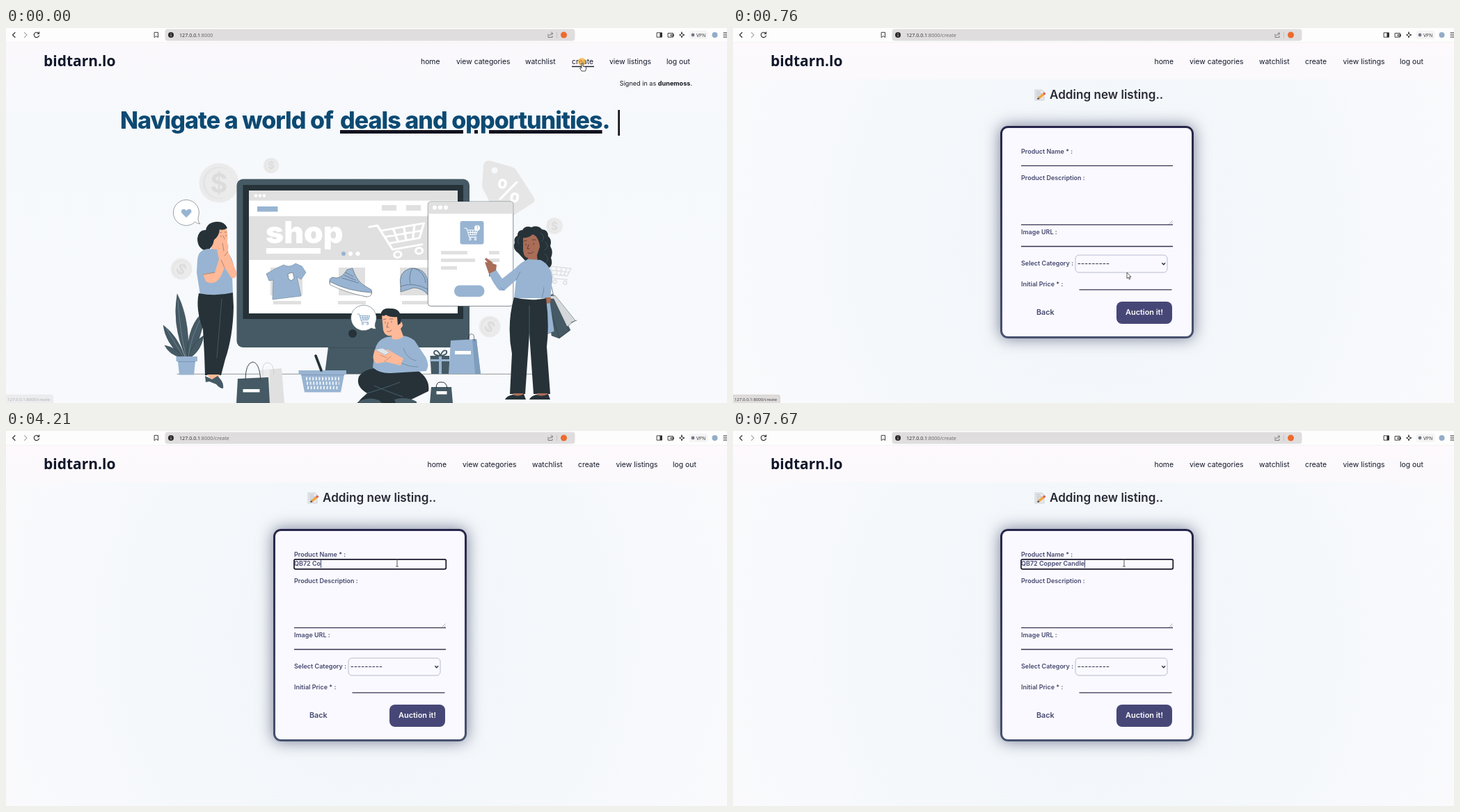
An HTML page that plays this animation: 1036 by 540 pixels, repeating every 8 s.

```html
<!DOCTYPE html>
<html lang="en">
<head>
<meta charset="utf-8">
<title>Create a listing</title>
<style>
html, body { margin: 0; width: 100%; height: 100%; overflow: hidden; }
body { position: relative; font-family: Inter, "Open Sans", sans-serif;
  background: radial-gradient(ellipse 560px 620px at 518px 300px, #f1f6fa, #f4f8fb 50%, #fafafd); }
svg, .layer { position: absolute; left: 0; top: 0; width: 1036px; height: 540px; }
svg { overflow: hidden; }
.header { position: absolute; top: 21px; left: 0; width: 100%; height: 53px;
  background: linear-gradient(#fdf9fc, #fbf9fc); }
#home { background: linear-gradient(#fbf8fc 21px, #f6f9fc 130px, #f7f9fc); }
.small { font-family: "Open Sans", "Noto Sans", sans-serif; }
.nav { font-size: 10.4px; fill: #121829; }
.headline { position: absolute; top: 113px; font: 800 34px/40px Inter, sans-serif; letter-spacing: -.028em;
  white-space: pre; color: #0d4a73; }
.headline u { text-decoration: underline 4.5px #10131f; text-underline-offset: 2px; }
.card { position: absolute; left: 384px; top: 141px; width: 272px; height: 300px; border: 3px solid transparent;
  border-radius: 11px; box-shadow: 0 0 22px rgba(40, 46, 82, .62);
  background: linear-gradient(#faf9ff, #faf9ff) padding-box, linear-gradient(#27254a, #47526f) border-box; }
.label { font-size: 9px; font-weight: 600; fill: #45496f; }
.typed { position: absolute; left: 414px; top: 185px; height: 12px; font: 600 9px/12px Inter, sans-serif;
  white-space: pre; color: #45496f; border-right: 1px solid transparent; }
.blue { fill: #98b4d2; } .teal { fill: #455a64; } .dark { fill: #263238; }
.grey { fill: #e0e0e0; } .pale { fill: #ebebeb; } .white { fill: #fff; }
.skin { fill: #ffb998; } .brown { fill: #a96d58; }
.line { fill: none; stroke: var(--c, #263238); stroke-width: var(--w, .6);
  stroke-linecap: round; stroke-linejoin: round; }
.coin text { font-weight: 700; font-size: 20px; fill: #dcdcdc; text-anchor: middle; }
</style>
</head>
<body>
<div class="header"></div>

<div class="layer" id="home">
<svg viewBox="0 0 1036 540">
  <defs>
    <g id="cart" fill="none" stroke="currentColor" stroke-linejoin="round" stroke-linecap="round">
      <path d="M0 4H6L14 27H36M8 9H40L35 21H12M10 15H37M17 9L19 21M25 9V21M33 9L30 21"/>
      <circle cx="17" cy="32" r="2.6"/><circle cx="33" cy="32" r="2.6"/>
    </g>
    <g id="coin" class="coin">
      <circle r="15" class="pale"/><circle r="12.300" fill="#e4e4e5"/><circle cx="1" r="11.500" class="pale"/>
      <text y="7.300">$</text>
    </g>
  </defs>

  <g class="nav">
    <text x="596">home</text><text x="647">view categories</text><text x="746">watchlist</text>
    <text x="813">create</text><text x="867">view listings</text><text x="949">log out</text>
  </g>
  <rect x="813" y="54.800" width="32" height="1.400" fill="#121829"/>
  <text x="986" y="83" text-anchor="end" font-size="9.100" fill="#15171f">Signed in as <tspan font-weight="700">dunemoss</tspan>.</text>
  <rect x="879.300" y="118" width="2.700" height="37" fill="#11131b"/>

  <!-- background pieces -->
  <use href="#coin" transform="translate(306 223) scale(1.9)"/>
  <use href="#coin" transform="translate(381 198) scale(.75)"/>
  <use href="#coin" transform="translate(788 285) scale(.8)"/>
  <use href="#coin" transform="translate(252 347) rotate(35) scale(1.03)"/>
  <use href="#coin" transform="translate(695 430) rotate(35) scale(1.03)"/>
  <path fill="#e6e6e6" d="M684 229L686 197Q688 190 695 191L727 200Q732 202 734 206L759 245Q761 249 757 252L729 270H705Z"/>
  <circle cx="702" cy="205" r="4.500" fill="#f6f9fc"/>
  <text x="722" y="249" font-size="41" font-weight="600" text-anchor="middle" class="white" transform="rotate(10 722 235)">%</text>
  <use href="#cart" transform="translate(776 334) rotate(6) scale(.93)" color="#e0e1e2" stroke-width="1.8"/>
  <path class="line" style="--w:.5" d="M246 498.300H757"/>

  <!-- heart bubble -->
  <path class="white" stroke="#37474f" stroke-width=".5" d="M272 279A18.500 18.500 0 1 1 276 273Q276 280 279 282Q274 282 272 279Z"/>
  <path class="blue" d="M259 273L253 267Q250 263 254 261Q257 260 259 263Q262 260 265 261Q268 264 265 267Z"/>

  <!-- monitor -->
  <path class="teal" d="M463 459H548L556 498H458Z"/>
  <path class="line" d="M463 460H548"/>
  <rect class="teal" x="331.500" y="217.500" width="334.500" height="242.500" rx="9"/>
  <rect class="dark" x="340.500" y="226" width="316.500" height="193"/>
  <rect class="white" x="349" y="234" width="300" height="177"/>
  <g class="grey">
    <path d="M349 234H649V248.500H349ZM349 271H649V334H349ZM540 255H561V263H540ZM575 255H596V263H575Z"/>
    <path d="M380 345H426V385H380ZM478 345H516V385H478ZM566 345H606V385H566Z"/>
    <path d="M384 393H424V398H384ZM477 393H517V398H477ZM569 393H606V398H569Z"/>
  </g>
  <g class="white"><circle cx="359" cy="241.500" r="2.300"/><circle cx="365" cy="241.500" r="2.300"/><circle cx="371" cy="241.500" r="2.300"/>
    <circle cx="495" cy="325" r="3"/><circle cx="505.500" cy="325" r="3"/><rect x="374" y="317" width="78" height="8"/></g>
  <circle class="blue" cx="485" cy="325" r="3"/>
  <rect class="blue" x="361" y="257" width="29.500" height="7.500"/>
  <text x="373" y="310" font-size="44.500" font-weight="900" class="white">shop</text>
  <use href="#cart" transform="translate(521 280) rotate(-10) scale(1.95 1.65)" color="#fff" stroke-width="1.7"/>
  <circle class="dark" cx="498" cy="440" r="6"/>

  <!-- products -->
  <path class="blue" stroke="#5b7690" stroke-width=".5" d="M388 346L399 341Q407 346 416 339L425 343L431 352L424 362L418 358L424 386L383 391L384 363L378 364L374 354Z"/>
  <path class="white" stroke="#37474f" stroke-width=".5" d="M405 354L412 352L414 360L410 364L406 361Z"/>
  <path class="blue" stroke="#37474f" stroke-width=".5" d="M465 363Q467 357 474 360Q483 360 490 348L498 346Q503 362 512 369L525 377Q528 385 518 387Q492 381 465 368Z"/>
  <path class="white" stroke="#37474f" stroke-width=".5" d="M465 365Q490 379 525 381Q526 387 518 387Q491 382 466 370Z"/>
  <path class="line" style="--w:.4" d="M488 352L499 358M486 356L502 363M483 360L506 367"/>
  <path class="blue" stroke="#37474f" stroke-width=".5" d="M567 372Q563 351 581 346Q604 345 606 366V384Q599 375 586 374L567 380Z"/>
  <path class="line" style="--w:.4" d="M567 372Q585 365 606 376M584 346Q578 356 581 368M587 346Q602 352 603 367"/>

  <!-- floating window -->
  <rect class="white" x="606.300" y="250" width="122.500" height="150.500" rx="4" stroke="#37474f" stroke-width=".6"/>
  <path class="grey" d="M606.600 267.500V254Q606.600 250.300 610 250.300H725Q728.500 250.300 728.500 254V267.500Z"/>
  <g class="white"><circle cx="616" cy="258.500" r="3"/><circle cx="624" cy="258.500" r="3"/><circle cx="632" cy="258.500" r="3"/></g>
  <rect class="blue" x="652.500" y="278" width="34" height="33.500" rx="3"/>
  <use href="#cart" transform="translate(659 286) scale(.47 .56)" color="#fff" stroke-width="1.9"/>
  <circle class="white" cx="677" cy="288" r="4"/>
  <text x="677" y="290" font-size="5.500" text-anchor="middle" fill="#7d9fc3">1</text>
  <path class="grey" d="M625 321H663V326H625ZM694 321H709V326H694ZM625 332H674V337H625ZM694 332H709V337H694ZM625 343H648V348H625Z"/>
  <rect class="teal" x="694" y="353" width="9" height="4.500"/>
  <rect class="blue" x="644" y="370.500" width="43.500" height="16.500" rx="8"/>

  <!-- plant -->
  <g class="teal" stroke="#263238" stroke-width=".4">
    <path d="M258 474Q238 427 246 383Q264 418 262 474Z"/>
    <path d="M260 474Q261 425 286 407Q283 445 264 474Z"/>
    <path d="M257 474Q247 444 226 428Q229 453 253 474Z"/>
    <path d="M262 474Q269 451 284 443Q281 463 266 474Z"/>
    <path d="M255 474Q245 460 228 457Q235 471 251 474Z"/>
  </g>
  <path class="line" style="--c:#90a4ae;--w:.5" d="M247 392Q250 440 259 474M284 412Q266 440 262 474M230 432L255 474"/>
  <path class="blue" d="M244.500 473H275V480H272L270 499.500H249L247 480H244.500Z"/>
  <path class="line" style="--c:#6784a3" d="M247 480.500H272"/>

  <!-- left woman -->
  <path class="skin" d="M302 287L317 288L318.500 299L318 309Q315 319 307 319L306 327L294 323L297 305Z"/>
  <path class="dark" d="M318 288Q314 278 302 279Q289 280 287 291Q277 290 275 303Q275 318 288 321Q297 317 299 305Q306 300 307 290Q312 292 318 288Z"/>
  <path class="blue" d="M291 318Q276 319 275 334L274 352L279 384Q302 388 326 382L325 356L328 350Q327 330 316 321L306 319Z"/>
  <path class="skin" d="M283 354L300 352L306 333L303 319Q302 310 307 307L311 310L315 306Q321 309 319 322L331 351Q332 362 324 360L314 345L309 357Q301 372 287 365Z"/>
  <path class="line" style="--c:#6c4a3d;--w:.5" d="M309 299V301M316 298V300M307 295L310 294M314 294L317 294M312 299L314 304M311 310L313 321M319 322L314 328M283 355L300 352M314 345L309 334"/>
  <path class="dark" d="M277 382Q301 387 326 381L327 402Q326 445 315 477L309 500H286L285 470L283 434Q272 404 277 382Z"/>
  <path class="line" style="--c:#607d8b;--w:.5" d="M310 390Q306 439 303 475"/>
  <path class="skin" d="M289 499H307L305 505L294 506Z"/>
  <path class="teal" d="M286 501L296 506L304 501Q307 504 309 507Q313 512 312 519Q307 519 302 513L292 509L287 510Z"/>

  <!-- bags and basket, left -->
  <path class="grey" d="M364 493L396 490L400 540H366Z"/><path class="pale" d="M364 493L379 491V540H366Z"/>
  <path class="line" style="--c:#b9c0c4" d="M369 500Q367 481 376 482Q385 482 385 499"/>
  <path class="teal" d="M333 505L377 503L379 540H331Z"/>
  <path class="line" style="--c:#37474f;--w:1" d="M344 507Q344 483 354 481Q364 481 366 507"/>
  <rect class="white" x="340.500" y="520" width="24" height="4.500"/>
  <path class="blue" d="M420.500 493H489V499H486L481 524.500H429L424 499H420.500Z"/>
  <path stroke="#edf3f8" stroke-width="4.600" stroke-dasharray="2 2.600" d="M431 505H480M432 511.500H479M433 518H478" fill="none"/>
  <path class="line" style="--c:#6c89a7" d="M424 499.500H486"/>
  <path class="line" style="--w:3.600" d="M445 472L453 493"/>

  <!-- gift and bags, right -->
  <path class="teal" d="M609.500 472H637V498H611Z"/>
  <path class="blue" d="M622 472H626V498H622ZM609 477H637V480H609Z"/>
  <path class="line" style="--c:#455a64;--w:1.800" d="M624 472Q612 471 616 465Q621 463 624 472Q628 462 633 465Q635 471 624 472"/>
  <path class="blue" d="M639 450L676 448L682 498H636Z"/><path fill="#7f9dbc" d="M670 448L676 448L682 498H674Z"/>
  <rect class="white" x="645" y="465" width="23" height="5"/>
  <path class="line" d="M664 448Q666 437 672 442L673 450"/>

  <!-- seated man -->
  <path class="white" stroke="#37474f" stroke-width=".5" d="M525 432A18.300 18.300 0 1 1 531 424Q529 430 532 433Q527 434 525 432Z"/>
  <use href="#cart" transform="translate(505 410) scale(.44 .5)" color="#7d9fc3" stroke-width="1.9"/>
  <path class="dark" d="M507 502Q502 516 519 526L510 534L505 540H572L607 523Q610 505 590 492L532 490Q514 491 507 502Z"/>
  <path class="line" style="--c:#607d8b" d="M519 526Q540 520 566 510M570 531Q544 522 529 515"/>
  <path class="teal" d="M510 536Q524 531 536 536L540 540H504ZM558 535Q575 530 590 538V540H560Z"/>
  <path class="blue" d="M547 445Q533 449 530 464L527 489Q538 498 553 497L587 495L604 494Q609 485 603 474L587 450Q578 443 568 443Z"/>
  <path class="line" style="--c:#5b7690" d="M571 461Q576 477 589 479M560 477Q573 488 592 488M533 465L540 469"/>
  <path class="skin" d="M540 413L542 435Q545 445 554 443L555 448Q565 450 571 444L567 433Q573 428 567 422L562 412Z"/>
  <path class="dark" d="M538 413Q540 402 553 404Q566 403 568 418L567 425L563 428L562 416Q552 417 546 413Q542 416 538 413Z"/>
  <path class="line" style="--c:#654337" d="M545 423V425M554 422V424M542 420L546 419M551 419L556 419M549 424L547 431L550 431M548 437Q552 438 554 435"/>
  <path class="skin" d="M530 463L549 463L557 468L571 476L567 486L547 481L532 483Q526 478 528 470Z"/>
  <path fill="#dfe6eb" stroke="#90a4ae" stroke-width=".5" d="M530 463L541 461L551 467L545 471Z"/>
  <path class="line" style="--c:#8e6350;--w:.5" d="M538 471L547 475M543 481L553 473"/>

  <!-- front bag -->
  <path class="teal" d="M611 517H640L642 540H609Z"/><rect class="white" x="618.500" y="523" width="15" height="4.500"/>
  <path class="line" style="--w:1" d="M618 519Q618 509 625 510Q633 509 634 519"/>

  <!-- right woman -->
  <path class="dark" d="M742 291Q746 284 755 287Q764 283 770 290Q779 290 779 300Q785 305 782 314Q787 322 783 331Q787 342 779 346Q771 352 764 346L754 344L736 324Q727 318 731 309Q729 302 735 299Q735 291 742 291Z"/>
  <path class="line" style="--c:#546e7a;--w:.5" d="M768 295Q776 300 770 307M775 308Q782 315 774 320M774 325Q783 332 775 339M738 301Q733 306 737 311"/>
  <path class="brown" d="M743 302Q751 303 757 297Q766 301 767 315L763 327L764 338L748 338L750 331Q744 331 743 320Z"/>
  <path class="line" style="--c:#48291f;--w:.7" d="M747 311V313M758 310V312M744 307L748 306M756 305L761 305M751 312L749 318L752 318M750 324Q755 326 758 322"/>
  <path class="blue" d="M750 333Q740 337 732 346L713 361L704 348L694 354Q701 370 709 378L716 378L733 363L730 389H777L785 365Q785 342 768 334Z"/>
  <path class="line" style="--c:#5b7690" d="M733 363L739 351M772 350Q776 369 770 389M716 378L711 374"/>
  <path class="brown" d="M694 354L690 343L688 337L696 338L705 341L704 349Z"/>
  <path class="brown" d="M695 341L688 333L690 331L700 338Z"/>

  <g stroke="#263238" stroke-width=".4">
    <path class="teal" d="M777 389L785 383L811 435L795 447L784 443Z"/>
    <path fill="#d5d8da" d="M780 386L789 385L818 421L805 431Z"/>
    <path class="teal" d="M777 390L787 390L809 436L795 446Z"/>
    <path class="blue" d="M773 391L781 389L788 437L773 442L770 431Z"/>
  </g>
  <path class="line" d="M778 371L780 388M783 369L787 386M812 424L820 421"/>
  <path class="blue" d="M769 341Q784 341 785 361L782 390L775 389L772 367Z"/>
  <path class="brown" d="M775 388L783 388L782 396L776 397Z"/>

  <path class="dark" d="M730 388Q754 394 776 389Q781 427 777 459L782 527H758L752 440L746 527H724L727 469Q719 427 730 388Z"/>
  <path class="line" style="--c:#607d8b" d="M752 400V447"/>
  <path class="brown" d="M729 526H743V531H728ZM763 526H778V531H763Z"/>
  <path class="dark" d="M728 528Q736 532 744 527L747 535H717Q719 530 728 528ZM762 528Q770 532 779 527L782 535H752Q754 530 762 528Z"/>
</svg>
<div class="headline" style="left:164px">Navigate a world of </div>
<div class="headline" style="left:480px"><u>deals and opportunities</u>.</div>
</div>

<div class="layer" id="form">
<div class="card"></div>
<svg viewBox="0 0 1036 540">
  <g class="nav">
    <text x="605.500">home</text><text x="656">view categories</text><text x="756">watchlist</text>
    <text x="822">create</text><text x="876.500">view listings</text><text x="958">log out</text>
  </g>
  <path fill="#e6e8ea" stroke="#b9bfc4" stroke-width=".6" d="M434 89H444L447 92V104H434Z"/>
  <path stroke="#9aa3aa" stroke-width=".7" d="M436 92H442M436 95H444M436 98H441M436 101H440"/>
  <path stroke="#f2a33c" stroke-width="3.400" d="M439.500 101L446 95.500"/>
  <path stroke="#dc6358" stroke-width="3.400" d="M446 95.500L448.500 93.500"/>
  <path fill="#51423a" d="M437 103L438.400 99.700L440.600 102.300Z"/>
  <text x="455" y="102" font-size="17.100" font-weight="600" fill="#2a2a36">Adding new listing..</text>

  <g class="label">
    <text x="414" y="181">Product Name * :</text><text x="414" y="219">Product Description :</text>
    <text x="414" y="297.300">Image URL :</text><text x="414" y="342.300">Select Category :</text>
    <text x="414" y="371.500">Initial Price * :</text>
    <text x="436" y="413" font-size="10.800">Back</text>
  </g>
  <path stroke="#35334f" stroke-width="1.300" d="M414 198.300H632M414 283.400H632M414 314.500H632M497.500 376.800H630.500"/>
  <path stroke="#777" stroke-width=".6" d="M626.500 282.500L631.500 277.500M629.500 282.500L631.500 280.500"/>
  <rect x="492" y="327" width="132" height="25" rx="5" fill="#faf9ff" stroke="#b7bccf"/>
  <path stroke="#33344f" stroke-width="1" stroke-dasharray="3.600 1.550" d="M495.500 339.500H541"/>
  <path fill="none" stroke="#2b2c42" stroke-width="1.300" d="M616.300 338.200L618.700 340.800L621.100 338.200"/>
  <rect x="551" y="394" width="80" height="32" rx="8" fill="#474777"/>
  <text x="591" y="413" text-anchor="middle" font-size="10.900" font-weight="600" fill="#fff">Auction it!</text>
  <rect id="focus" x="414" y="184.800" width="218.300" height="14" rx="2" fill="#faf9ff" stroke="#18172b" stroke-width="1.700"/>
</svg>
<div class="typed" id="typed"></div>
</div>

<svg viewBox="0 0 1036 540">
  <text class="small" x="54" y="55" font-size="21" font-weight="700" fill="#10172a">bidtarn.lo</text>

  <!-- browser bar -->
  <rect width="1036" height="21" fill="#fdfdfd"/><rect y="20.500" width="1036" height=".6" fill="#eeecee"/>
  <rect x="228.500" y="1.500" width="589" height="17" rx="4" fill="#dfdddd"/>
  <g fill="none" stroke="#2b2b2b" stroke-width="1.100" stroke-linecap="round">
    <path d="M13 6.500L9.500 10L13 13.500"/><path stroke="#a9a9a9" d="M26.500 6.500L30 10L26.500 13.500"/>
    <path id="reload" d="M46.700 7.400A3.700 3.700 0 1 0 47.500 11M47.600 5.800V8.300H45"/>
    <path id="stop" d="M41.500 7.200L47 12.700M47 7.200L41.500 12.700"/>
    <path stroke-width=".9" d="M213.500 6.300H218.500V13.500L216 11.600L213.500 13.500Z"/>
    <path stroke="#666" stroke-width=".8" d="M779 9V13.500H785V11.500M781 11Q781 8 785.500 8M783.500 6L785.800 8L783.500 10"/>
    <path stroke="#bbb" stroke-width=".7" d="M791.500 6V14"/>
    <path stroke-width=".9" d="M935.500 6.800H942.500V13.200H935.500ZM951.500 7.500H958.500V13.200H951.500ZM955.500 9.500H959.500V11.500H955.500ZM971 6L972 9L975 10L972 11L971 14L970 11L967.500 10L970 9Z"/>
    <path d="M1031 7H1036M1031 10H1036M1031 13H1036"/>
  </g>
  <rect x="939.500" y="7" width="3" height="6" fill="#2b2b2b"/>
  <circle cx="237" cy="10" r="4" fill="#2b2b2b"/><path stroke="#dfdddd" d="M237 9.500V12.300M237 7.500V8.500" stroke-width=".9"/>
  <circle cx="801.500" cy="10" r="4.500" fill="#ee6a2c"/>
  <rect x="981.500" y="4" width="27" height="12" rx="4" fill="#f5f4f4"/>
  <circle cx="987" cy="10" r="2.400" fill="#70788a"/>
  <text class="small" x="992" y="12.500" font-size="6.800" fill="#333">VPN</text>
  <circle cx="1018.500" cy="10" r="4" fill="#93adc6"/>
  <text class="small" x="249" y="12.700" font-size="7.150" fill="#2c2c2c">127.0.0.1<tspan fill="#686868">:8000<tspan id="path">/create</tspan></tspan></text>

  <g id="status">
    <path fill="#dedbda" stroke="#cbc8c7" stroke-width=".6" d="M-1 528.300H65Q67.500 528.300 67.500 531V541H-1Z"/>
    <text class="small" x="2" y="536.700" font-size="6.100" fill="#3c3c3c">127.0.0.1:8000/create</text>
  </g>

  <circle id="halo" cx="827.500" cy="48.500" r="5.500" fill="#f3ad35" opacity=".75"/>
  <g id="pointer" stroke-linejoin="round">
    <path id="arrow" fill="#fff" stroke="#333" stroke-width=".8" d="M0 0V8.700L2 7L3.400 10L4.800 9.300L3.400 6.500H6Z"/>
    <path id="hand" fill="#fff" stroke="#222" stroke-width=".8" d="M-1 0Q0 -1 1 0V4L5 5Q6 5.500 5.500 8L4.500 11H-1L-3.500 7Q-3.500 5.500 -1 7Z"/>
    <path id="beam" fill="none" stroke="#444" stroke-width=".9" d="M-1.800 -5H1.800M0 -5V5M-1.800 5H1.800"/>
  </g>
</svg>

<script>
const LOOP = 8000;
const NAME = "QB72 Copper Candle";
const TYPO = NAME.slice(0, 16) + "e";

// time, x, y
const moves = [
  [0, 828, 51], [60, 824, 54], [120, 797, 77], [190, 745, 113], [250, 690, 139], [310, 647, 153],
  [370, 619, 160], [410, 607, 175], [470, 596, 210], [530, 586, 250], [590, 578, 290],
  [660, 571, 325], [740, 566, 352], [820, 563, 366], [950, 563, 330], [1030, 562, 250], [1100, 562, 190],
];

// time, typed text (or its length), caret shown
const keys = [
  [0, 0, 0], [1870, 1, 1], [1990, 2, 1], [2340, 3, 1], [2580, 4, 1], [3100, 4, 0], [3630, 5, 1],
  [4030, 6, 1], [4210, 7, 1], [4730, 7, 0], [4850, 8, 1], [4970, 9, 1], [5080, 10, 1], [5200, 11, 1],
  [5380, 12, 1], [5790, 13, 1], [5910, 14, 1], [6030, 15, 1], [6210, 16, 1], [6380, TYPO, 1],
  [6910, TYPO, 0], [7380, TYPO, 1], [7480, 16, 1], [7570, 17, 1], [7670, 18, 1],
];

const el = id => document.getElementById(id);
const show = (id, on) => { el(id).style.visibility = on ? "visible" : "hidden"; };
const at = (list, t) => list.findLast(item => item[0] <= t);

function draw(t) {
  const left = t >= 60, loaded = t >= 370;
  el("home").style.display = loaded ? "none" : "block";
  el("form").style.display = loaded ? "block" : "none";
  show("path", left);
  show("stop", left && !loaded);
  show("reload", !left || loaded);
  show("status", t < 820);
  el("status").style.opacity = left ? 1 : .4;
  show("halo", t < 120);
  show("focus", t >= 1170);

  const [, x, y] = at(moves, t);
  el("pointer").setAttribute("transform", `translate(${x} ${y})`);
  show("hand", t < 120);
  show("beam", t >= 820);
  show("arrow", t >= 120 && t < 820);

  const [, text, caret] = at(keys, t);
  el("typed").textContent = typeof text === "string" ? text : NAME.slice(0, text);
  el("typed").style.borderColor = caret ? "#45496f" : "transparent";
}

document.querySelectorAll(".nav text").forEach(link => link.setAttribute("y", 51.5));
const start = performance.now();
function tick(now) {
  draw(Math.max(0, now - start) % LOOP);
  requestAnimationFrame(tick);
}
draw(0);
requestAnimationFrame(tick);
</script>
</body>
</html>
```
